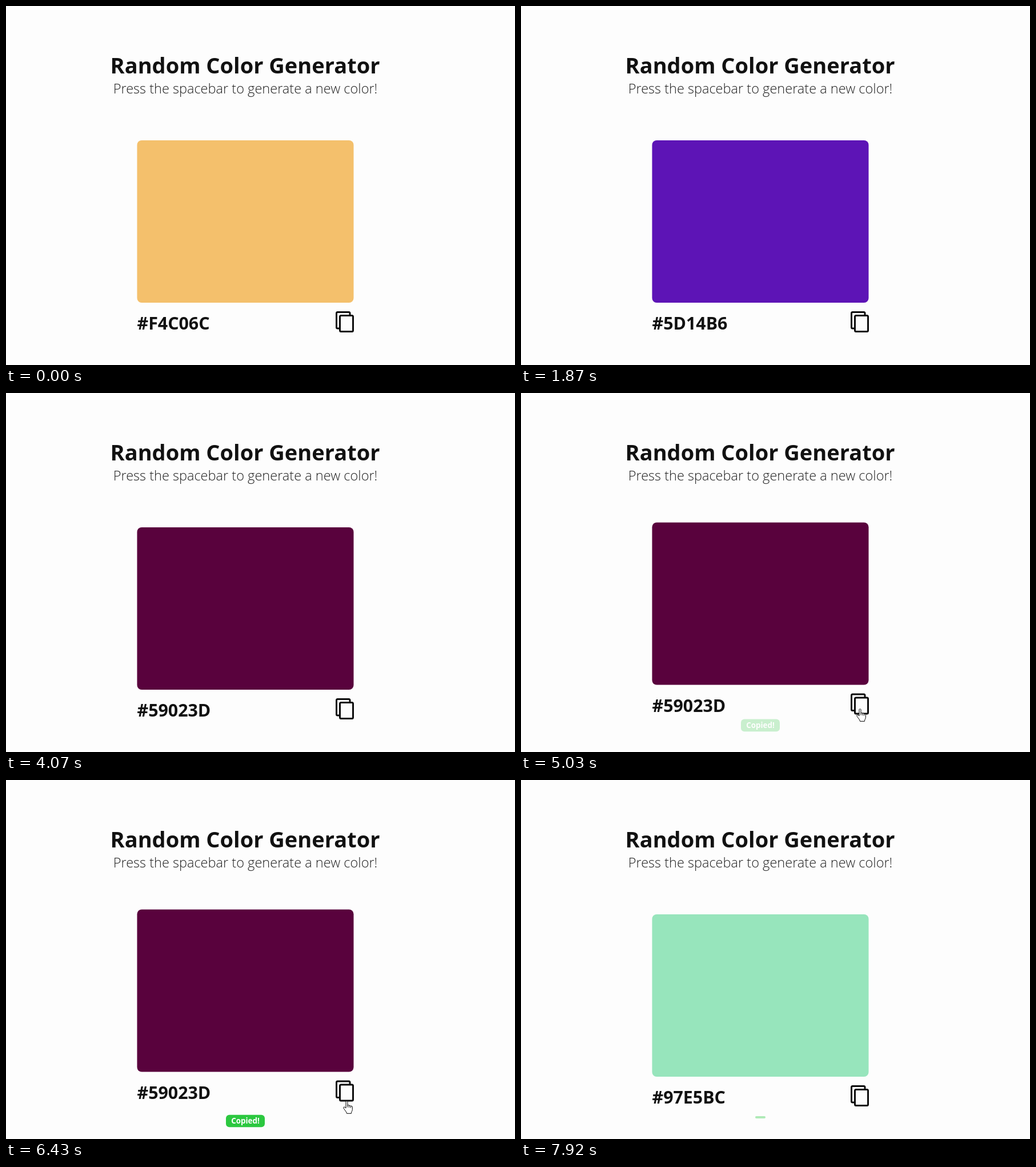
An HTML page for the animation above (7990 ms loop, 891x628 px).

```html
<!DOCTYPE html>
<html lang="en">
<head>
<meta charset="utf-8">
<title>Random Color Generator</title>
<style>
  html, body { margin: 0; width: 100%; height: 100%; overflow: hidden; background: #fdfdfd; }
  svg { display: block; width: 891px; height: 628px; }
  text { font-family: "Open Sans", sans-serif; font-weight: 700; fill: #111; }
  .hint { font-weight: 300; fill: #222; }
  .label { fill: #fff; }
</style>
</head>
<body>
<svg viewBox="0 0 891 628">
  <rect width="891" height="628" fill="#fdfdfd"/>
  <text x="182.6" y="118" font-size="38">Random Color Generator</text>
  <text class="hint" x="419" y="153" font-size="23.55" text-anchor="middle">Press the spacebar to generate a new color!</text>

  <g id="card">
    <rect id="swatch" x="229.5" y="235" width="379" height="284" rx="8"/>
    <text id="hex" x="229.5" y="566" font-size="30.4"></text>
    <g fill="none" stroke="#0c0c0c" stroke-width="3">
      <path d="M584 564H580.5Q578.5 564 578.5 562V537.5Q578.5 535.5 580.5 535.5H600Q602 535.5 602 537.5V541"/>
      <rect x="584.5" y="541.5" width="23" height="28" rx="2"/>
    </g>
  </g>

  <g id="badge">
    <g id="full">
      <rect x="385" y="585.7" width="68" height="21.6" rx="6" fill="#2cc840"/>
      <text class="label" x="419" y="601.3" font-size="13.4" text-anchor="middle">Copied!</text>
    </g>
    <rect id="empty" x="410" y="595" width="18" height="4" rx="2" fill="#2cc840"/>
  </g>

  <g id="cursor" fill="#fff" stroke="#000" stroke-linejoin="round">
    <path id="arrow" d="M.5 .5V16.5L4.2 13L6.7 18.8L9.1 17.8L6.6 12.1H11.5Z"/>
    <g id="hand" transform="translate(-6 0)">
      <path d="M5 13V2.2C5 .1 8 .1 8 2.2V8.5C8 7 10.8 7.2 10.8 9C11 7.8 13.4 8 13.5 9.8C14 8.8 16.3 9 16.3 11V15.5C16.3 18 14.5 19 14.3 22.3H6.5C6.5 19.5 1 14.5 .8 12.5C.6 10.5 3 10.5 5 13Z"/>
      <path fill="none" d="M8 8.5V11.5M10.8 9V12M13.5 9.8V12.5"/>
    </g>
  </g>
</svg>
<script>
const LOOP = 7990, TICK = 70, COPY = 4950, RESET = 7840;
const $ = id => document.getElementById(id);

const clamp = v => Math.max(0, Math.min(1, v));
const smooth = v => v * v * (3 - 2 * v);
const easeOut = v => 1 - (1 - v) ** 2;
const mix = (a, b, f) => a + (b - a) * f;
const show = (id, on) => $(id).setAttribute('display', on ? 'inline' : 'none');
const move = (id, x, y) => $(id).setAttribute('transform', `translate(${x} ${y})`);

const colors = [
  { at: 0, hex: '#F4C06C' }, { at: 410, hex: '#EEC9BA' }, { at: 1870, hex: '#5D14B6' },
  { at: 3140, hex: '#D870A4' }, { at: 4070, hex: '#59023D' }, { at: RESET, hex: '#97E5BC' }
];

// The pointer rests between glides; its first and last stops lie off stage
const home = { x: 880, y: 640 };
const glides = [
  { from: 200, to: 480, x: 905, y: 590, ease: smooth },
  { from: 4330, to: 4820, x: 593, y: 552, ease: easeOut },
  { from: 5170, to: 6010, x: 485, y: 574, ease: smooth },
  { from: 6010, to: 6430, x: 596, y: 561, ease: smooth },
  { from: 6430, to: 7140, x: 601, y: 555, ease: easeOut },
  { from: 7400, to: 7800, x: 905, y: 590, ease: smooth }
];

function pointerAt(t) {
  return glides.reduce((p, g) => {
    const f = g.ease(clamp((t - g.from) / (g.to - g.from)));
    return { x: mix(p.x, g.x, f), y: mix(p.y, g.y, f) };
  }, home);
}

function drawPointer(tick) {
  const p = pointerAt(tick), x = Math.round(p.x), y = Math.round(p.y);
  const overIcon = x >= 577 && x <= 609 && y >= 525 && y <= 563;
  move('cursor', x, y);
  show('hand', overIcon);
  show('arrow', !overIcon);
}

function drawBadge(tick, full) {
  const shown = full
    ? smooth(clamp((tick - COPY) / 250))
    : 1 - easeOut(clamp((tick - RESET) / 180));
  $('badge').setAttribute('opacity', shown);
  move('badge', 0, (full ? -20 : -11) * (1 - shown));
  show('full', full);
  show('empty', !full);
}

function draw(t) {
  // Moving parts advance in ticks
  const phase = t < 7000 ? 60 : 0;
  const tick = Math.floor((t - phase) / TICK) * TICK + phase;
  const { hex } = colors.findLast(c => c.at <= t);
  const full = t < RESET;
  $('swatch').setAttribute('fill', hex);
  $('hex').textContent = hex;
  move('card', 0, full && tick >= COPY ? -8.5 : 0);
  drawBadge(tick, full);
  drawPointer(tick);
}

const start = performance.now();
function frame() {
  draw((performance.now() - start) % LOOP);
  requestAnimationFrame(frame);
}
frame();
</script>
</body>
</html>
```
